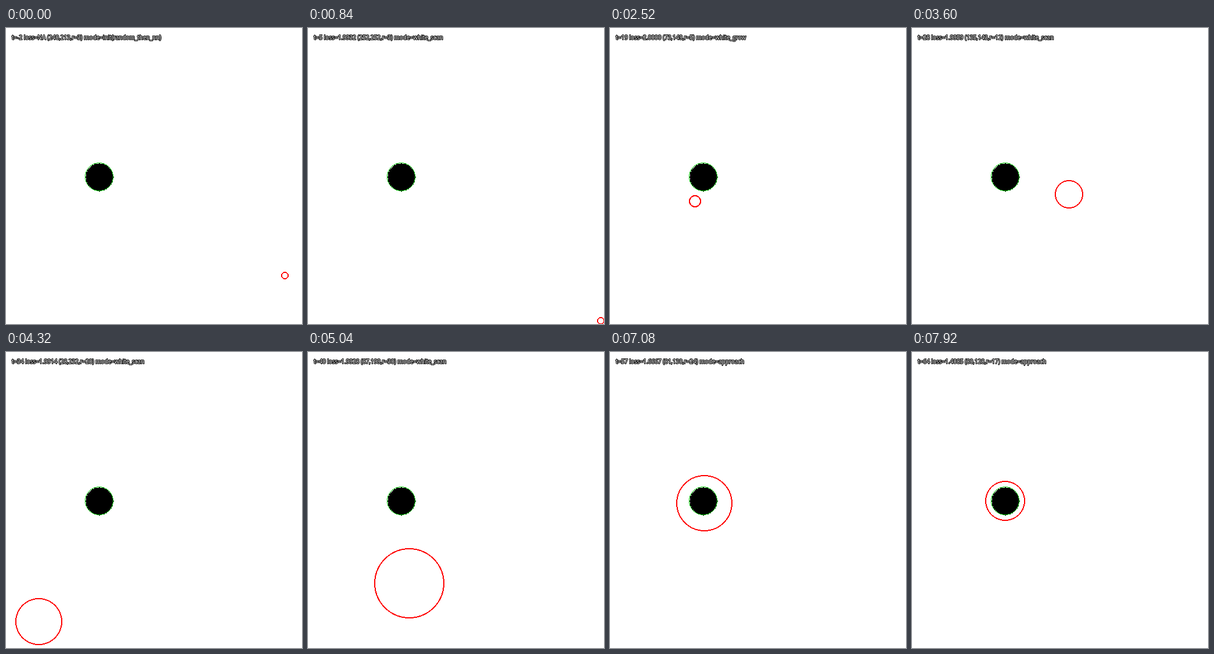
An HTML page with a canvas that plays this animation: 510 px wide and 510 px high, repeating every 8 s.

```html
<!DOCTYPE html>
<html lang="en">
<head>
<meta charset="utf-8">
<title>Circle search</title>
<style>
html, body { margin: 0; width: 100%; height: 100%; overflow: hidden; background: #fff; }
canvas { display: block; width: 510px; height: 510px; }
</style>
</head>
<body>
<canvas id="stage" width="510" height="510"></canvas>
<script>
const ctx = document.getElementById('stage').getContext('2d');
const LOOP = 8000, STEP = 120, FIRST = -2;
const GROW = 12, CONTACT = 43;
const goal = { x: 80, y: 128, r: 12 };
const contact = { x: 91, y: 165 };

// Turning points of the scan
const turns = [
  { t: -2, x: 240, y: 213 }, { t: 5, x: 252, y: 252 }, { t: 12, x: 115, y: 62 },
  { t: 15, x: 129, y: 88 }, { t: 19, x: 73, y: 149 }, { t: 23, x: 168, y: 247 },
  { t: 28, x: 135, y: 143 }, { t: 33, x: 18, y: 237 }, { t: 40, x: 87, y: 199 },
  { t: 41, x: 106, y: 224 }, { t: CONTACT, ...contact }
];

const mix = (a, b, u) => Math.round(a + (b - a) * u);

function radiusAt(t) {
  if (t >= CONTACT) return 81 - t;
  return 3 + Math.round(Math.max(0, t - GROW) ** 2 / 29);
}

// Scan between turns, then a damped swing into the goal
function poseAt(t) {
  const r = radiusAt(t);
  if (t > CONTACT) {
    const s = t - CONTACT;
    const swing = Math.exp(-0.178 * s) * Math.cos(0.4 * s);
    return { x: mix(goal.x, contact.x, swing), y: mix(goal.y, contact.y, swing), r };
  }
  const i = Math.max(1, turns.findIndex(p => p.t >= t));
  const a = turns[i - 1], b = turns[i];
  const u = (t - a.t) / (b.t - a.t);
  return { x: mix(a.x, b.x, u), y: mix(a.y, b.y, u), r };
}

function modeAt(t) {
  if (t < 0) return 'init(random_then_nn)';
  if (t > CONTACT) return 'approach';
  return t > GROW && t % 4 === 3 ? 'white_grow' : 'white_scan';
}

function lossAt(t, r, mode) {
  if (t < 0) return 'NA';
  if (mode === 'white_grow') return '2.0000';
  if (mode === 'approach') return (2 - 0.5915 * Math.pow(17 / r, 1.663)).toFixed(4);
  const noise = Math.abs(Math.sin(t * 12.9898) * 43758.5453) % 1;
  return (1.99 + 0.007 * noise).toFixed(4);
}

// Pixel ring on the doubled grid: each octant rounds along its longer axis
function ring({ x, y, r }, width, color) {
  const outer = 2 * r, inner = outer - width + 1;
  ctx.fillStyle = color;
  for (let dy = -outer; dy <= outer; dy++) {
    for (let dx = -outer; dx <= outer; dx++) {
      const far = Math.max(Math.abs(dx), Math.abs(dy));
      const near = Math.min(Math.abs(dx), Math.abs(dy));
      const inside = far - 0.5 <= Math.sqrt(outer * outer - near * near);
      const hole = far + 0.5 <= Math.sqrt(inner * inner - near * near);
      if (inside && !hole) ctx.fillRect(2 * x + dx, 2 * y + dy, 1, 1);
    }
  }
}

function disk({ x, y, r }) {
  ctx.fillStyle = '#000';
  for (let dy = -r; dy <= r; dy++) {
    const half = Math.floor(Math.sqrt(r * r - dy * dy));
    ctx.fillRect(2 * (x - half), 2 * (y + dy), 4 * half + 2, 2);
  }
}

function label(text) {
  ctx.font = '10px "Open Sans", "Noto Sans", sans-serif';
  ctx.lineWidth = 2;
  ctx.lineJoin = 'round';
  ctx.strokeStyle = '#000';
  ctx.fillStyle = '#fff';
  ctx.strokeText(text, 10, 20);
  ctx.fillText(text, 10, 20);
}

function draw(t) {
  const pose = poseAt(t), { x, y, r } = pose;
  const mode = modeAt(t);
  ctx.fillStyle = '#fff';
  ctx.fillRect(0, 0, 510, 510);
  disk(goal);
  ring(goal, 1, '#00c800');
  ring(pose, 2, '#f00');
  label(`t=${t} loss=${lossAt(t, r, mode)} (${x},${y},r=${r}) mode=${mode}`);
}

let shown = null;
const start = performance.now();
function tick() {
  const ms = Math.max(0, performance.now() - start) % LOOP;
  const t = FIRST + Math.floor(ms / STEP);
  if (t !== shown) draw(shown = t);
  requestAnimationFrame(tick);
}
tick();
</script>
</body>
</html>
```
